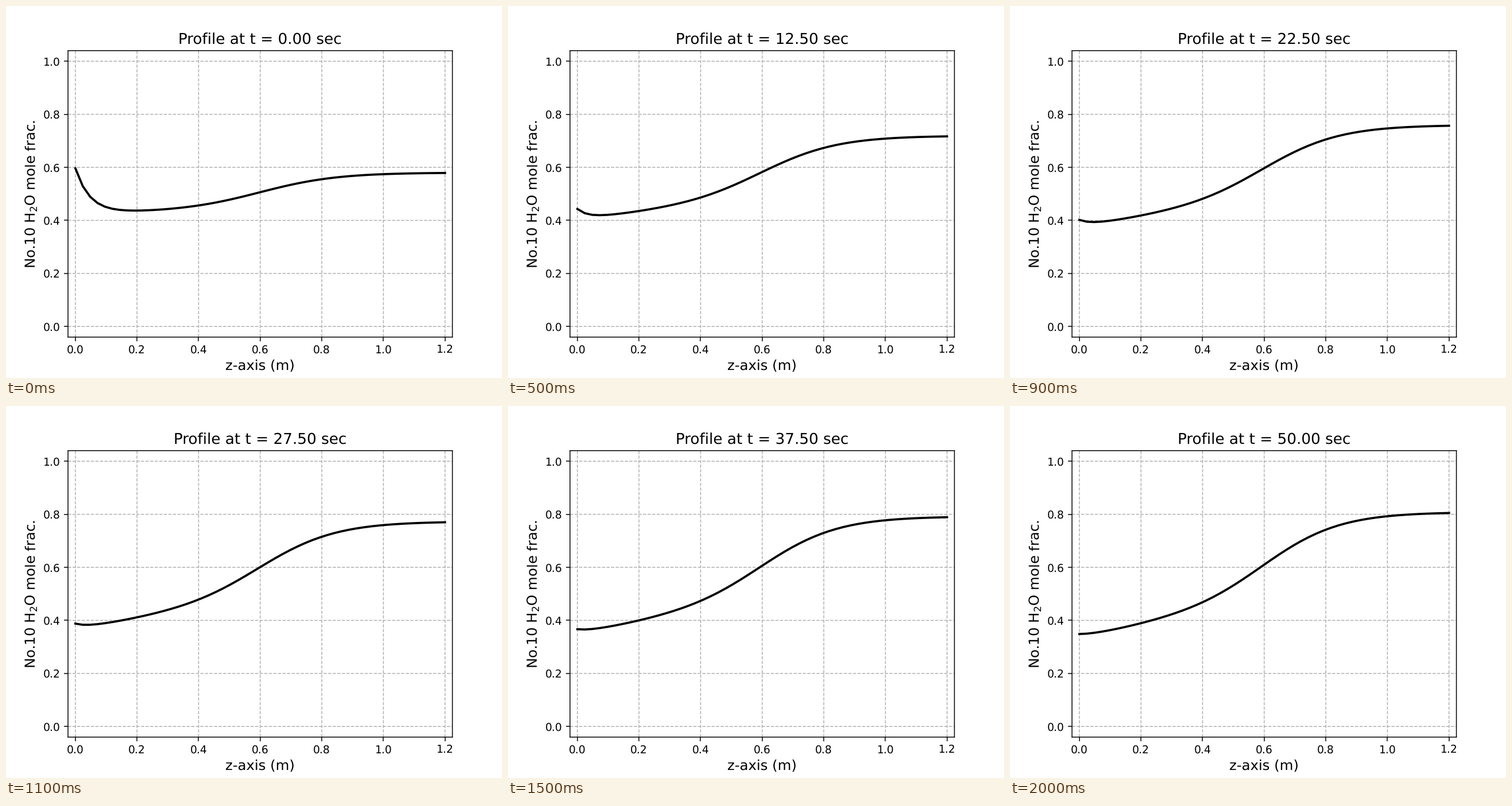
Write a matplotlib script that moves like this. It is 864x648 px and loops after 2100 ms.

```python
import numpy as np
import matplotlib.pyplot as plt
from matplotlib.animation import FuncAnimation

FRAMES, INTERVAL, STEP = 21, 100, 2.5   # STEP: simulated seconds per frame

plt.rcParams.update({"path.snap": False, "text.hinting": "none"})


def settle(t, start, change, half):
    """Saturating change that is half done at t = half."""
    return start + change * t / (t + half)


def profile(z, t):
    level = settle(t, 0.507, 0.1277, 7.45)
    step = settle(t, 0.073, 0.174, 24.4) * np.tanh((z - 0.6) / 0.25)
    dip = settle(t, 0.008, 0.111, 22.8) * np.exp(-(z / 0.34)**1.5)
    inlet = settle(t, 0.169, -0.1815, 4.2) * np.exp(-z / settle(t, 0.047, -0.018, 3))
    return level + step - dip + inlet


z = np.linspace(0, 1.2, 51)

fig, ax = plt.subplots(figsize=(6.4, 4.8), dpi=135)
line, = ax.plot(z, profile(z, 0), "k", linewidth=2)
title = ax.set_title("", fontsize=14)
ax.set_xlabel("z-axis (m)", fontsize=13)
ax.set_ylabel("No.10 H$_2$O mole frac.", fontsize=13)
ax.set_xlim(-0.024, 1.224)
ax.set_ylim(-0.04, 1.04)
ax.grid(linestyle="--")


def update(i):
    t = STEP * i
    line.set_ydata(profile(z, t))
    title.set_text(f"Profile at t = {t:.2f} sec")
    return line, title


anim = FuncAnimation(fig, update, frames=FRAMES, interval=INTERVAL, repeat=True)
plt.show()
```
